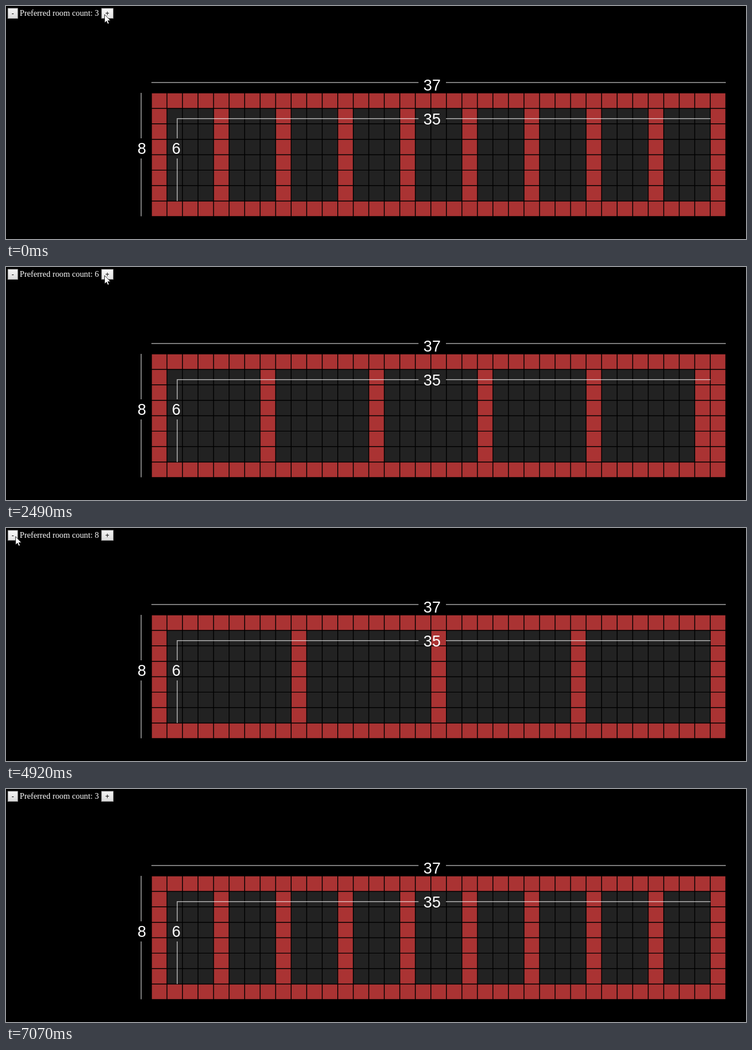
An HTML page for the animation above (8.76 s loop, 1280 by 405 pixels).

```html
<!DOCTYPE html>
<html lang="en">
<head>
<meta charset="utf-8">
<title>Preferred room count</title>
<style>
  html, body { margin: 0; width: 100%; height: 100%; overflow: hidden; background: #000; }
  svg { display: block; width: 100vw; height: 100vh; }
  .label { font: 14.3px "Liberation Serif", "Times New Roman", serif; fill: #fff; }
  .sign { font: 11.9px "Liberation Sans", Arial, sans-serif; text-anchor: middle; fill: #000; }
  .size { font: 26.85px "Liberation Sans", Arial, sans-serif; text-anchor: middle; fill: #fff; }
  .rule { fill: none; stroke: #fff; stroke-opacity: .64; stroke-width: 1.5; }
</style>
</head>
<body>
<svg viewBox="0 0 1280 405">
  <defs>
    <linearGradient id="idle" x2="0" y2="1"><stop stop-color="#f5f5f5"/><stop offset="1" stop-color="#dadada"/></linearGradient>
    <linearGradient id="hover" x2="0" y2="1"><stop stop-color="#fafafa"/><stop offset="1" stop-color="#e2e2e2"/></linearGradient>
    <linearGradient id="down" x2="0" y2="1"><stop stop-color="#dcdcdc"/><stop offset="1" stop-color="#f2f2f2"/></linearGradient>
  </defs>
  <rect width="1280" height="405"/>
  <rect id="minus" x="3.3" y="4" width="16.9" height="17.6" stroke="#a0a0a0" stroke-width=".9"/>
  <text class="sign" x="11.7" y="16.8">-</text>
  <text id="label" class="label" x="23.7" y="17.2"></text>
  <rect id="plus" x="165.2" y="4" width="20.3" height="17.6" stroke="#a0a0a0" stroke-width=".9"/>
  <text class="sign" x="175.3" y="16.8">+</text>
  <path id="walls" fill="#a33"/>
  <path id="rooms" fill="#222"/>
  <path id="grid" stroke="#000" stroke-width="1.45"/>
  <path class="rule" d="M251.5 133H713.5M761 133H1245M233.7 151V230M233.7 265V365.5"/>
  <path class="rule" d="M713.5 195.7H296.2V230M296.2 265V339M761 195.7H1218.5"/>
  <text class="size" x="737" y="147.3">37</text>
  <text class="size" x="737" y="205.5">35</text>
  <text class="size" x="235" y="257.3">8</text>
  <text class="size" x="294.4" y="257.3">6</text>
  <path id="cursor" fill="#fff" stroke="#000" stroke-width=".8"
    d="M0 0V14.6L3.3 11.5L5.5 16.5L7.9 15.5L5.7 10.6H10.3Z"/>
</svg>
<script>
const LOOP = 8760, COLS = 37, ROWS = 8, CELL = 26.85, LEFT = 251.6, TOP = 151.1;
const $ = id => document.getElementById(id);
const colX = c => LEFT + c * CELL;
const rowY = r => TOP + r * CELL;

// press time, release time, change of count
const clicks = [
  [890, 930, 1], [1220, 1310, 1], [2430, 2490, 1], [2740, 2770, 1], [3020, 3080, 1],
  [5030, 5120, -1], [5330, 5360, -1], [5670, 5730, -1], [6220, 6250, -1], [6580, 6670, -1]
];

const box = (c, r, w, h) => `M${colX(c)} ${rowY(r)}h${w * CELL}v${h * CELL}h${-w * CELL}z`;

function roomPath(size) {
  let d = "";
  for (let c = 1; c < COLS - 1; c += size + 1)
    d += box(c, 1, Math.min(size, COLS - 1 - c), ROWS - 2);
  return d;
}

function gridPath() {
  let d = "";
  for (let c = 0; c <= COLS; c++) d += `M${colX(c)} ${rowY(0)}V${rowY(ROWS)}`;
  for (let r = 0; r <= ROWS; r++) d += `M${colX(0)} ${rowY(r)}H${colX(COLS)}`;
  return d;
}

// progress 0..1 in n hard steps, the first at a and the last at b
function stepped(t, a, b, n) {
  if (t < a) return 0;
  return Math.min(1, (Math.floor((t - a) / (b - a) * (n - 1) + 1e-6) + 1) / n);
}

const smooth = p => p * p * (3 - 2 * p);

function paintButton(id, over, pressed) {
  $(id).setAttribute("fill", `url(#${pressed ? "down" : over ? "hover" : "idle"})`);
  $(id).setAttribute("stroke", over ? "#7c7c7c" : "#a0a0a0");
}

let shown = 0;
function draw(t) {
  let count = 3, pressed = 0;
  for (const [down, up, change] of clicks) {
    if (t >= down) count += change;
    if (t >= down && t < up) pressed = change;
  }
  if (count !== shown) {
    shown = count;
    $("label").textContent = "Preferred room count: " + count;
    $("rooms").setAttribute("d", roomPath(count));
  }

  const exit = stepped(t, 6830, 7070, 8);
  const x = 170.5 - 154 * smooth(stepped(t, 4130, 4920, 27));
  const y = 14.8 - 34 * exit * exit;
  $("cursor").setAttribute("transform", `translate(${x} ${y})`);
  $("cursor").setAttribute("visibility", exit < 1 ? "visible" : "hidden");

  const inside = y > 4;
  paintButton("minus", inside && x < 20.5, pressed < 0);
  paintButton("plus", inside && x > 165, pressed > 0);
}

$("walls").setAttribute("d", box(0, 0, COLS, ROWS));
$("grid").setAttribute("d", gridPath());

const start = performance.now();
function tick() {
  draw((performance.now() - start) % LOOP);
  requestAnimationFrame(tick);
}
tick();
</script>
</body>
</html>
```
